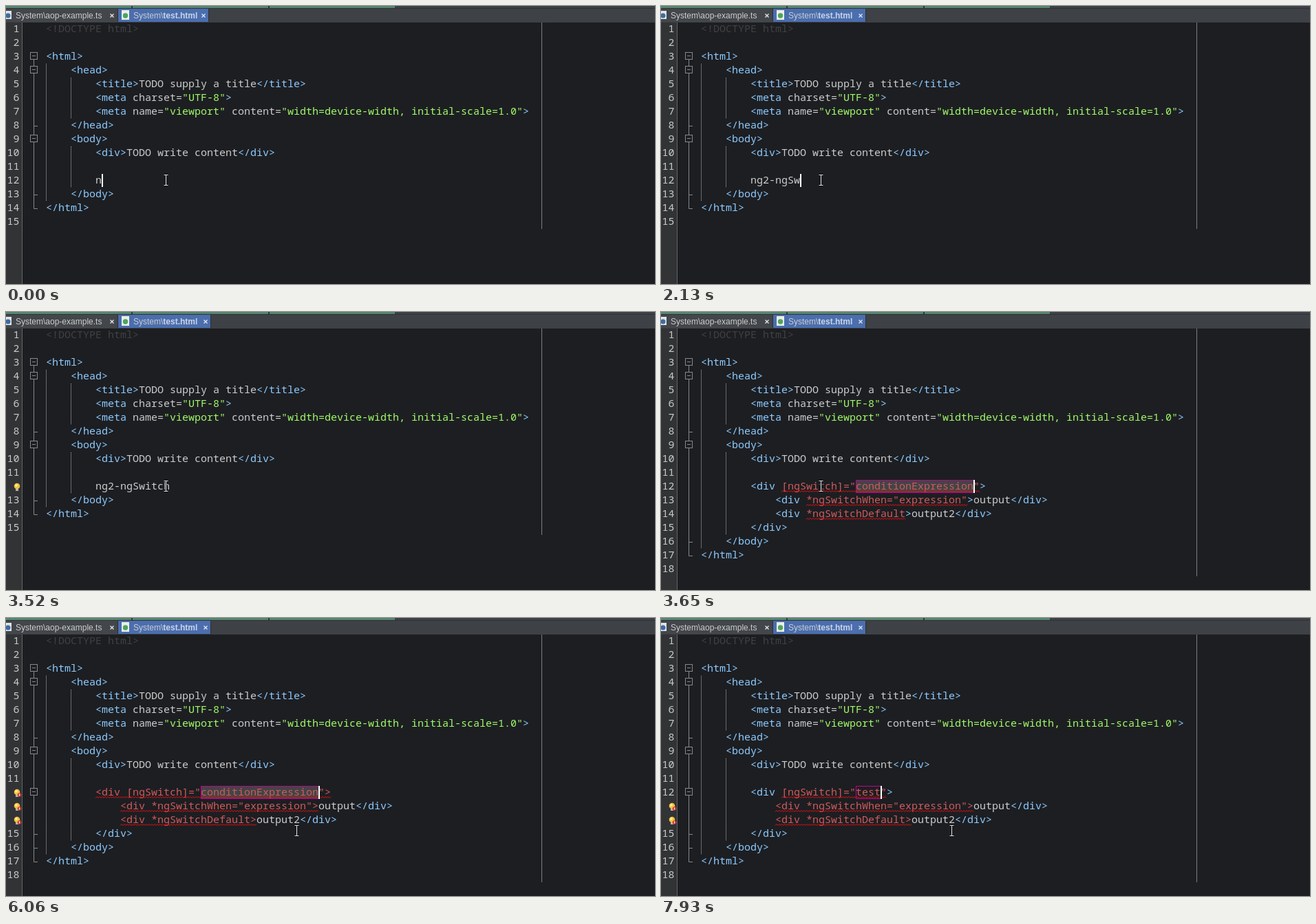
An HTML page that plays this animation: 943x404 px, repeating every 8000 ms.

```html
<!DOCTYPE html>
<html lang="en">
<head>
<meta charset="UTF-8">
<title>Code template</title>
<style>
html, body { margin: 0; width: 100%; height: 100%; overflow: hidden; background: #1d1e22; }
svg { display: block; width: 100%; height: 100%; }
text { white-space: pre; }
.code { font: 15px "Noto Sans Mono", "DejaVu Sans Mono", monospace; font-variant-ligatures: none; }
.tab { font: 12px "Liberation Sans", Arial, sans-serif; }
.bold { font-weight: bold; }
.num { fill: #c9cacb; text-anchor: end; }
.tag { fill: #8ccbff; }
.txt { fill: #cccccc; }
.str { fill: #a0fb68; }
.doc { fill: #404143; }
.err { fill: #cf5b5b; }
.fold { fill: none; stroke: #85878a; }
.guide { stroke: #b4b4b4; stroke-dasharray: 1 1; }
.wave { fill: none; stroke: #f01010; }
</style>
</head>
<body>
<svg id="stage" viewBox="0 0 943 404" preserveAspectRatio="none"></svg>
<script>
const LOOP = 8000, LEFT = 58, CELL = 9, ROW = 20, TOP = 24;
const stage = document.getElementById('stage');

// Each step changes part of the state left by the step before it.
const steps = [
  [0, { typed: 'n', caret: true, tabEnd: 295, bulbs: [], mouse: [232.5, 253] }],
  [150, { tabEnd: 298 }],
  [290, { caret: false }],
  [430, { typed: 'ng', caret: true }],
  [580, { typed: 'ng2' }],
  [880, { caret: false }],
  [1030, { typed: 'ng2-', caret: true }],
  [1330, { caret: false }],
  [1460, { typed: 'ng2-ng', caret: true }],
  [1730, { caret: false }],
  [1850, { typed: 'ng2-ngS', caret: true }],
  [2130, { typed: 'ng2-ngSw' }],
  [2400, { caret: false }],
  [2530, { typed: 'ng2-ngSwit', caret: true }],
  [2770, { typed: 'ng2-ngSwitch' }],
  [3070, { caret: false }],
  [3200, { bulbs: [12] }],
  [3370, { caret: true }],
  [3520, { caret: false }],
  [3650, { value: 'conditionExpression', selected: true, caret: true, bulbs: [] }],
  [3960, { caret: false }],
  [4090, { checked: true, firstBad: true, bulbs: [12, 13, 14] }],
  [4230, { caret: true }],
  [4530, { caret: false }],
  [4840, { caret: true }],
  [5090, { caret: false }],
  [5360, { caret: true }],
  [5640, { caret: false }],
  [5940, { caret: true }],
  [6060, { mouse: [422.5, 309] }],
  [6180, { caret: false }],
  [6550, { caret: true }],
  [6820, { caret: false }],
  [7100, { caret: true }],
  [7380, { caret: false }],
  [7660, { caret: true }],
  [7790, { value: 'te', selected: false, firstBad: false, bulbs: [13, 14] }],
  [7930, { value: 'test' }]
];
const states = [];
steps.forEach(([, change], i) => states.push({ ...states[i - 1], ...change }));

const colX = col => LEFT + col * CELL;
const rowY = row => TOP + (row - 1) * ROW;
const midY = row => rowY(row) + 10.5;
const escapeText = s => s.replace(/&/g, '&amp;').replace(/</g, '&lt;').replace(/>/g, '&gt;');
const span = (cls, s) => `<tspan class="${cls}">${escapeText(s)}</tspan>`;
const rect = (x, y, w, h, fill, extra = '') =>
  `<rect x="${x}" y="${y}" width="${w}" height="${h}" fill="${fill}" ${extra}/>`;
const path = (d, cls) => `<path d="${d}" class="${cls}"/>`;
const label = (x, y, cls, content) => `<text x="${x}" y="${y}" class="${cls}">${content}</text>`;

function highlight(source) {
  const token = /(<!.*>)|("[^"]*")|(<\/?\w+|>)|[^<">]+/g;
  return source.replace(token, (s, doc, str, tag) =>
    span(doc ? 'doc' : str ? 'str' : tag ? 'tag' : 'txt', s));
}

function wave(from, to, row) {
  let d = '';
  for (let x = from, i = 0; x <= to; x += 2, i++) {
    d += `${i ? 'L' : 'M'}${x} ${rowY(row) + (i % 2 ? 15.5 : 17.5)}`;
  }
  return path(d, 'wave');
}

function codeLine([col, source, bad], row) {
  const [from, to] = bad || [source.length, source.length];
  const content = highlight(source.slice(0, from)) +
    (bad ? span('err', source.slice(from, to)) : '') + highlight(source.slice(to));
  return label(colX(col), rowY(row) + 14, 'code', content) +
    (bad ? wave(colX(col + from), colX(col + to), row) : '');
}

// Marks either the whole opening tag or only its attribute as wrong.
function badLine(col, source, whole) {
  const close = source.indexOf('>');
  return [col, source, whole ? [0, close + 1] : [5, close]];
}

function codeLines(s) {
  const body = s.value
    ? [badLine(8, `<div [ngSwitch]="${s.value}">`, s.firstBad),
       badLine(12, '<div *ngSwitchWhen="expression">output</div>', s.checked),
       badLine(12, '<div *ngSwitchDefault>output2</div>', s.checked),
       [8, '</div>']]
    : [[8, s.typed]];
  return [
    [0, '<!DOCTYPE html>'], [0, ''],
    [0, '<html>'],
    [4, '<head>'],
    [8, '<title>TODO supply a title</title>'],
    [8, '<meta charset="UTF-8">'],
    [8, '<meta name="viewport" content="width=device-width, initial-scale=1.0">'],
    [4, '</head>'],
    [4, '<body>'],
    [8, '<div>TODO write content</div>'], [0, ''],
    ...body,
    [4, '</body>'], [0, '</html>'], [0, '']
  ];
}

function cross(x) {
  return `<path d="M${x - 2.5} 11.5l5 5m0 -5l-5 5" stroke="#e2e4e8" stroke-width="1.4"/>`;
}

function tabs(end) {
  return rect(0, 0, 943, 24, '#3e4145') + rect(0, 0, 565, 3, '#568570') +
    [182, 381].map(x => rect(x, 0, 2, 3, '#2c3b37')).join('') +
    rect(0, 3, 943, 1, '#303236') +
    rect(0, 4, 162, 19, '#43464a') + rect(162, 4, 1, 19, '#2d2f32') +
    rect(163, 4, end - 164, 19, '#4a6eaf') + rect(end - 1, 4, 1, 19, '#2d2f32') +
    rect(0, 7, 8, 12, '#dfe5ec') + '<circle cx="3" cy="14" r="3.5" fill="#3f6ba0"/>' +
    label(14, 18, 'tab txt', 'System\\aop-example.ts') + cross(154) +
    rect(168, 6, 11, 14, '#e9eeeb') + '<circle cx="173.5" cy="14" r="3.7" fill="#4fa45b"/>' +
    label(185, 18, 'tab txt', 'System\\<tspan class="bold" fill="#ccd4e4">test.html</tspan>') +
    cross(end - 8);
}

function bulb(row, alert) {
  const y = rowY(row);
  return `<circle cx="16" cy="${y + 9}" r="4.3" fill="#f3c13c"/>` +
    `<circle cx="15" cy="${y + 8}" r="1.8" fill="#fff0a6"/>` +
    rect(14, y + 13, 4, 3, '#b4b4b0') +
    (alert ? `<circle cx="19.5" cy="${y + 13}" r="2.8" fill="#d8392f"/>` +
      rect(19, y + 11.5, 1, 3, '#ffffff') : '');
}

function folds(s, last) {
  const boxes = [3, 4, 9, ...(s.checked ? [12] : [])];
  const ticks = [8, last - 1, ...(s.checked ? [15] : [])];
  return path(`M40.5 ${midY(3)}V${midY(last)}H46` +
      ticks.map(row => `M40.5 ${midY(row)}h5.5`).join(''), 'fold') +
    boxes.map(row => {
      const y = midY(row) - 2;
      return rect(35.5, y - 5, 10, 10, '#1d1e22', 'stroke="#85878a"') +
        path(`M38 ${y}h5`, 'fold');
    }).join('');
}

function guides(s, last) {
  const guide = (col, from, to) =>
    path(`M${colX(col) + .5} ${rowY(from)}V${rowY(to + 1)}`, 'guide');
  return guide(0, 4, last - 1) + guide(4, 5, 7) + guide(4, 10, last - 2);
}

function pointer([x, y]) {
  const d = `M${x - 3} ${y - 7.5}h2.5l.5 .5l.5 -.5h2.5M${x} ${y - 7}v14` +
    `M${x - 3} ${y + 7.5}h2.5l.5 -.5l.5 .5h2.5`;
  return `<path d="${d}" fill="none" stroke="#08090a" stroke-width="2.4"/>` +
    `<path d="${d}" fill="none" stroke="#e8e8e8" stroke-width="1.1"/>`;
}

function draw(s) {
  const lines = codeLines(s), last = lines.length - 1;
  const valueX = colX(25), width = s.value ? s.value.length * CELL : 0;
  const caretX = s.value ? valueX + width : colX(8 + s.typed.length);
  const y = rowY(12);
  const field = s.value
    ? rect(valueX + .5, y + .5, width, 18, s.selected ? '#434446' : 'none', 'stroke="#c4008f"')
    : '';
  const numbers = lines.map((_, i) => s.bulbs.includes(i + 1)
    ? bulb(i + 1, s.checked)
    : label(19.5, rowY(i + 1) + 14, 'code num', i + 1)).join('');

  stage.innerHTML = rect(0, 0, 943, 404, '#1d1e22') + tabs(s.tabEnd) +
    rect(0, 24, 23, 380, '#313335') + rect(23, 24, 1, 380, '#626466') +
    rect(778, 24, 1, lines.length * ROW, '#7c7e80') +
    numbers + guides(s, last) + folds(s, last) + field +
    lines.map((line, i) => codeLine(line, i + 1)).join('') +
    (s.caret ? rect(caretX, y, 2, 19, '#ffffff') : '') + pointer(s.mouse);
}

let shown = -1;
const start = performance.now();
function tick() {
  const time = (performance.now() - start) % LOOP;
  const current = steps.filter(([at]) => at <= time).length - 1;
  if (current !== shown) draw(states[shown = current]);
  requestAnimationFrame(tick);
}
tick();
</script>
</body>
</html>
```
